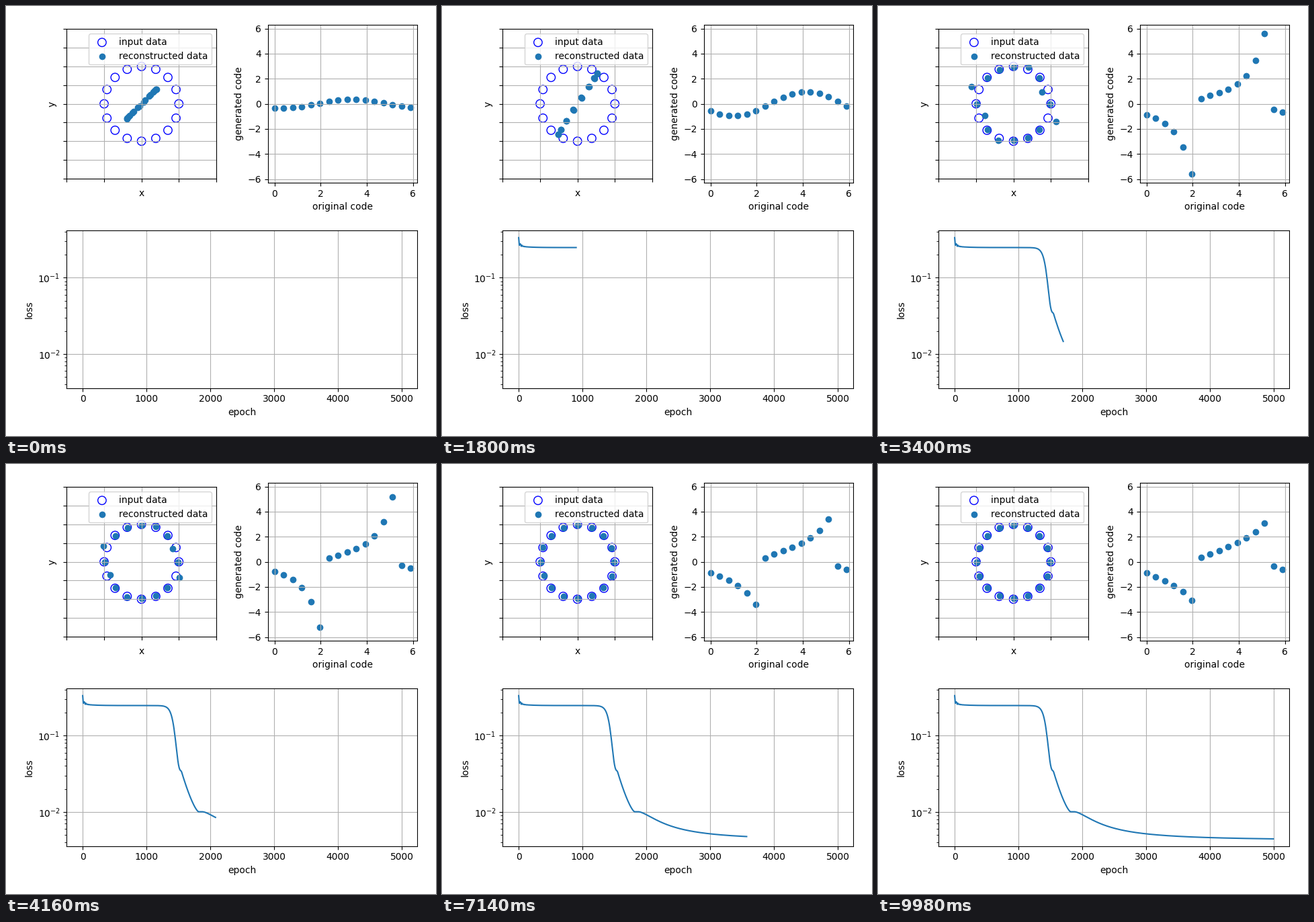
A matplotlib script that plays this animation: 640 px wide and 640 px high, repeating every 10 s.

```python
import numpy as np
import matplotlib.pyplot as plt
from matplotlib.animation import FuncAnimation

SIZE, FRAMES, STEP = 640, 500, 10
# Half a turn of samples; the other half is its point reflection.
HALF = np.arange(6, 14)
U = (HALF - 6) / 7
THETA = np.arange(6, 22) * np.pi / 8 % (2 * np.pi)
MAX_THETA = 15 * np.pi / 8

# Line phase: frame, rate, code amplitude, peak sample, extent in x and y
LINE_KEYS = [(0, 5, .36, .65, .40, .40),
             (33, 2, .85, 2.2, .60, .75),
             (90, 1, .95, 2.5, .535, .83)]
# Ring phase: frame, rate, code offset, slope, curl, softness, wobble, roundness
RING_KEYS = [(144, 2, .80, 1.6, 3.3, .63, .30, 0),
             (168, 2, .45, 1.6, 3.6, 0, .30, 1),
             (208, 3.4, .30, 1.6, 3.3, 0, .13, 1),
             (499, 1, .33, 1.98, .77, 0, 0, 1)]


def tween(i, keys):
    """Relax exponentially from each key's values to the next."""
    i = np.clip(i, keys[0][0], keys[-1][0])
    n = max(k for k in range(len(keys) - 1) if i >= keys[k][0])
    a, b = np.array(keys[n]), np.array(keys[n + 1])
    u = (i - a[0]) / (b[0] - a[0])
    return (a + (b - a) * np.expm1(-a[1] * u) / np.expm1(-a[1]))[2:]


def line_state(i):
    """Codes follow a sine, and points lie on a straight segment."""
    amp, peak, dx, dy = tween(i, LINE_KEYS)
    wave = -np.cos((HALF - peak) * np.pi / 8)
    return np.array([amp * wave, -dx * wave, -dy * wave])


def ring_state(i):
    """Codes rise towards a jump while two strands bend into a circle."""
    offset, slope, curl, soft, wobble, roundness = tween(i, RING_KEYS)
    code = offset + slope * U + curl * U ** 5
    code *= 1 - soft * (U ** 10 + (1 - U) ** 10)
    side = np.tanh(2.5 * code)
    strand = np.array([.31 * code - 1.05 * side, .75 * side - .63 * code])
    angle = HALF * np.pi / 8
    radius = .985 + wobble * (1 - U) * np.cos((HALF - 7) * np.pi / 2)
    circle = radius * np.array([np.cos(angle), np.sin(angle)])
    return np.vstack([code, strand + (circle - strand) * roundness])


def state_at(i):
    """Return codes, x and y of all 16 samples."""
    line, ring = line_state(i), ring_state(i)
    half = line + (ring - line) * min(1, np.exp((i - 144) / 13))
    return np.hstack([half, -half])


def loss_curve(e):
    """Noisy start, plateau, sudden collapse, second drop, slow decay."""
    plateau = (.249 + .012 * np.exp(-e / 150)
               + .075 * np.exp(-e / 25) * np.cos(np.pi * e / 26) ** 2)
    collapse = .86 * (1 - np.exp(-np.exp(np.minimum((e - 1465) / 42, 5))))
    second = .535 * (1 - (1 - np.clip((e - 1545) / 270, 0, 1)) ** 1.4)
    late = (np.maximum(e - 1880, 0) / 513) ** 1.5
    return plateau * 10 ** -(collapse + second + .38 * late / (late + 1))


def add_axes(left, right, top, bottom, xlabel, ylabel, **limits):
    """Add axes placed in pixels measured from the top left corner."""
    ax = fig.add_axes([left / SIZE, 1 - bottom / SIZE,
                       (right - left) / SIZE, (bottom - top) / SIZE],
                      facecolor="none")
    ax.set(xlabel=xlabel, ylabel=ylabel, **limits)
    ax.grid(True)
    return ax


fig = plt.figure(figsize=(SIZE / 100, SIZE / 100), dpi=100, facecolor="white")

data_ax = add_axes(90.4, 312.9, 34.35, 256.85, "x", "y",
                   xlim=(-2, 2), ylim=(-2, 2))
data_ax.set_xticks(np.arange(-2, 3), [])
data_ax.set_yticks(np.arange(-2, 2.1, .5), [])

code_ax = add_axes(389.6, 612.1, 28.35, 262.85,
                   "original code", "generated code",
                   xlim=(-.05 * MAX_THETA, 1.05 * MAX_THETA),
                   ylim=(-2 * np.pi, 2 * np.pi))
code_ax.set_xticks(np.arange(0, 7, 2))
code_ax.set_yticks(np.arange(-6, 7, 2))

loss_ax = add_axes(90.4, 612.1, 334.1, 568.6, "epoch", "loss")
loss_ax.set_yscale("log")

epochs = np.arange(FRAMES) * STEP
losses = loss_curve(epochs)
codes, xs, ys = state_at(0)
rings = data_ax.scatter(np.cos(THETA), np.sin(THETA), s=80,
                        facecolors="none", edgecolors="b", label="input data")
dots = data_ax.scatter(xs, ys, color="C0", label="reconstructed data")
code_dots = code_ax.scatter(THETA, codes, color="C0")
loss_line, = loss_ax.plot(epochs, losses, color="C0")
legend = data_ax.legend(loc="upper right")

# Render grids, labels and legend once, to lay them over the moving points.
moving = [rings, dots, code_dots, loss_line]
for artist in moving:
    artist.set_visible(False)
fig.patch.set_alpha(0)
fig.canvas.draw()
overlay = np.array(fig.canvas.buffer_rgba())
fig.patch.set_alpha(None)
for artist in moving:
    artist.set_visible(True)
legend.remove()
for ax in (data_ax, code_ax, loss_ax):
    ax.set_axis_off()
fig.figimage(overlay, zorder=1)
loss_ax.set_zorder(2)


def update(i):
    codes, xs, ys = state_at(i)
    dots.set_offsets(np.column_stack([xs, ys]))
    code_dots.set_offsets(np.column_stack([THETA, codes]))
    loss_line.set_data(epochs[:i + 1], losses[:i + 1])
    return moving


anim = FuncAnimation(fig, update, frames=FRAMES, interval=20,
                     init_func=lambda: update(0), repeat=True)
plt.show()
```
